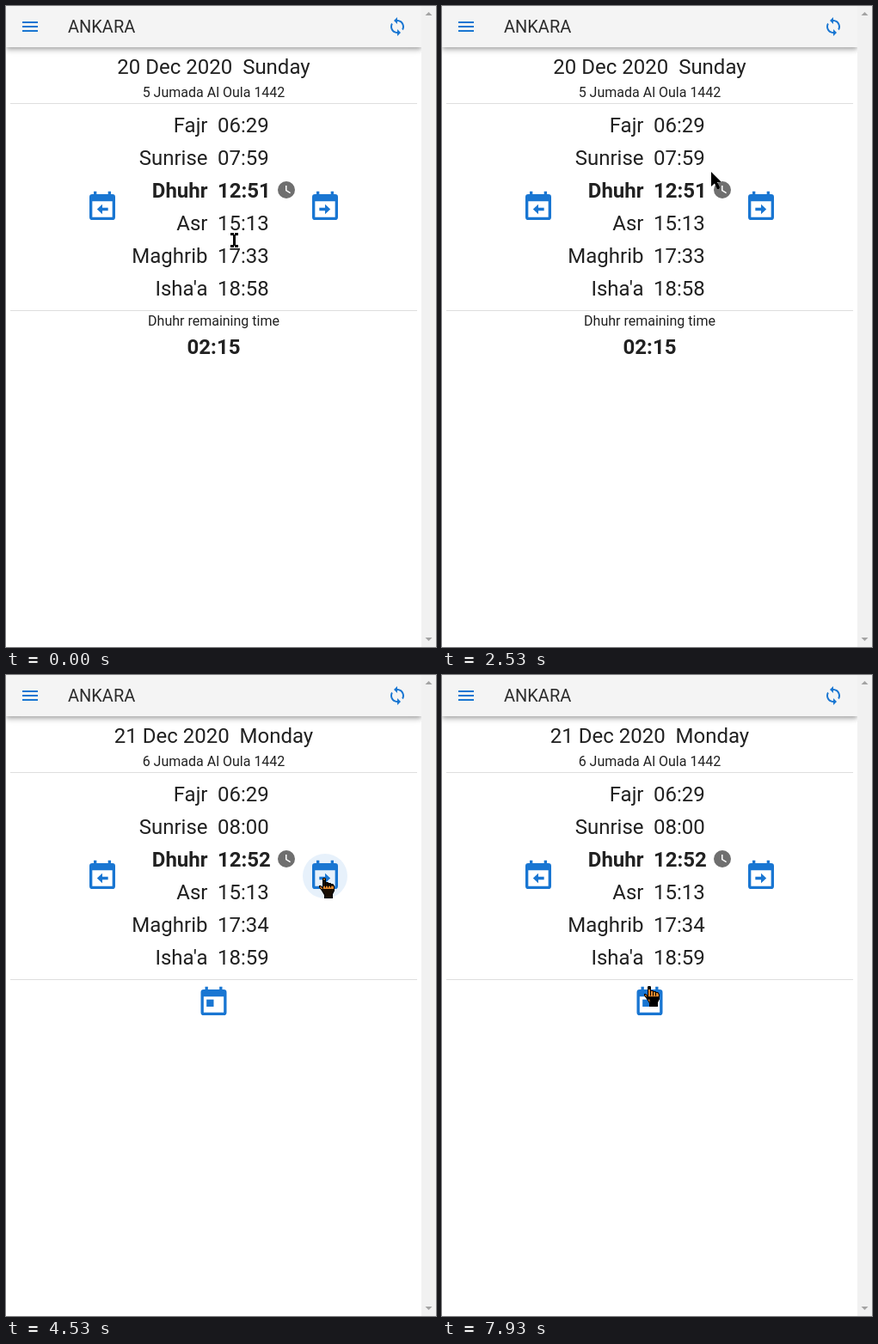
These frames come from a looping animation (500x746 px, 8000 ms). An HTML page with a canvas:

```html
<!DOCTYPE html>
<html lang="en">
<head>
<meta charset="utf-8">
<title>Prayer times</title>
<style>
html, body { margin: 0; width: 100%; height: 100%; overflow: hidden; background: #fff; }
canvas { display: block; width: 500px; height: 746px; }
</style>
</head>
<body>
<canvas id="stage"></canvas>
<script>
const W = 500, H = 746, PAGE = 483, LOOP = 8000, STEP = 200 / 3;
const BLUE = '#1976d2', INK = '#212121';
const canvas = document.getElementById('stage');
const ratio = window.devicePixelRatio || 1;
canvas.width = W * ratio;
canvas.height = H * ratio;
const ctx = canvas.getContext('2d');

const icons = {
  menu: 'M3 18h18v-2H3zM3 13h18v-2H3zM3 6v2h18V6z',
  sync: 'M12 4V1L8 5l4 4V6c3.31 0 6 2.69 6 6 0 1.01-.25 1.97-.7 2.8l1.46 1.46C19.54 15.03 20 13.57 20 12c0-4.42-3.58-8-8-8z' +
    'm0 14c-3.31 0-6-2.69-6-6 0-1.01.25-1.97.7-2.8L5.24 7.74C4.46 8.97 4 10.43 4 12c0 4.42 3.58 8 8 8v3l4-4-4-4z',
  clock: 'M12 2a10 10 0 1 0 0 20a10 10 0 1 0 0-20zm4.2 14.2L11 13V7h1.5v5.2l4.5 2.7z',
  calendar: 'M19 3h-1V1h-2v2H8V1H6v2H5a2 2 0 0 0-2 2v14a2 2 0 0 0 2 2h14a2 2 0 0 0 2-2V5a2 2 0 0 0-2-2zm0 16H5V8h14z',
  right: 'M8 12.5h4V10l3.7 3.5L12 17v-2.5H8z',
  left: 'M16 12.5h-4V10l-3.7 3.5L12 17v-2.5h4z',
  day: 'M7 10h5v5H7z'
};
for (const k in icons) icons[k] = new Path2D(icons[k]);

const names = ['Fajr', 'Sunrise', 'Dhuhr', 'Asr', 'Maghrib', "Isha'a"];
const days = [
  ['20 Dec 2020', 'Sunday', '5', '06:29 07:59 12:51 15:13 17:33 18:58'],
  ['21 Dec 2020', 'Monday', '6', '06:29 08:00 12:52 15:13 17:34 18:59'],
  ['22 Dec 2020', 'Tuesday', '7', '06:30 08:00 12:52 15:14 17:34 18:59']
];

// from = time the view becomes current, out = time it starts to slide away
const views = [
  { day: 0, from: 0, out: 3960, dir: -1 },
  { day: 1, from: 4520, out: 5158, dir: -1 },
  { day: 2, from: 5720, out: 6900, dir: 1 },
  { day: 1, from: 7460, out: 9999, dir: 1 }
];
const SLIDE = 530;
const LOAD = [1344, 2400];

const buttons = {
  sync: { x: 455, y: 24, r: 24, armed: 1330, taps: [1333] },
  prev: { x: 112, y: 234, r: 26, armed: 6650, taps: [6800] },
  next: { x: 371, y: 234, r: 26, armed: 3730, taps: [3733, 5000] },
  today: { x: 241.5, y: 381, r: 26, armed: 9999, taps: [] }
};

const track = [
  [0, 265, 272], [867, 453, 15], [1533, 453, 15], [1933, 347, 132],
  [2400, 318, 186], [3000, 309, 207], [3200, 346, 238], [3533, 369, 236],
  [6067, 369, 236], [6600, 112, 231], [7467, 112, 231],
  [7800, 223, 329], [7933, 240, 362], [8000, 240, 362]
];

function bezier(x1, y1, x2, y2) {
  const at = (a, b, s) => 3 * a * s * (1 - s) ** 2 + 3 * b * s * s * (1 - s) + s ** 3;
  return x => {
    if (x <= 0) return 0;
    if (x >= 1) return 1;
    let lo = 0, hi = 1;
    for (let i = 0; i < 24; i++) {
      const mid = (lo + hi) / 2;
      if (at(x1, x2, mid) < x) lo = mid; else hi = mid;
    }
    return at(y1, y2, lo);
  };
}
const ease = bezier(.25, .1, .25, 1);
const easeInOut = bezier(.42, 0, .58, 1);

// Hermite path with zero speed at both sides of a rest
function pointer(t) {
  let i = 0;
  while (i < track.length - 2 && t >= track[i + 1][0]) i++;
  const a = track[i], b = track[i + 1], span = b[0] - a[0];
  const u = Math.min(1, (t - a[0]) / span);
  const same = (p, q) => p[1] === q[1] && p[2] === q[2];
  const slope = (n, c) => {
    const p = track[n - 1], k = track[n], q = track[n + 1];
    if (!p || !q || same(p, k) || same(k, q)) return 0;
    return (q[c] - p[c]) / (q[0] - p[0]) * span;
  };
  const mix = c => a[c] * (2 * u ** 3 - 3 * u * u + 1) + b[c] * (3 * u * u - 2 * u ** 3) +
    slope(i, c) * (u ** 3 - 2 * u * u + u) + slope(i + 1, c) * (u ** 3 - u * u);
  return { x: Math.round(mix(1)), y: Math.round(mix(2)) };
}

function text(s, x, y, size, align = 'center', weight = 400, color = INK) {
  ctx.font = `${weight} ${size}px Roboto, sans-serif`;
  ctx.textAlign = align;
  ctx.fillStyle = color;
  ctx.fillText(s, x, y);
}

function icon(name, x, y, scale = 1, color = BLUE) {
  ctx.save();
  ctx.translate(x, y);
  ctx.scale(scale, scale);
  ctx.fillStyle = color;
  ctx.fill(icons[name], 'evenodd');
  ctx.restore();
}

function disc(x, y, r, alpha) {
  ctx.globalAlpha = alpha;
  ctx.fillStyle = BLUE;
  ctx.beginPath();
  ctx.arc(x, y, r, 0, 7);
  ctx.fill();
  ctx.globalAlpha = 1;
}

function feedback(b, t, hot) {
  if (hot === b && t >= b.armed) disc(b.x, b.y, b.r, .1);
  for (const tap of b.taps) {
    const u = (t - tap) / 350;
    if (u >= 0 && u < 1) disc(b.x, b.y, b.r * Math.min(1, .3 + u * 1.2), .2 * (1 - u));
  }
}

function calendar(b, glyph) {
  const x = b.x - 20, y = b.y - 20;
  icon('calendar', x, y, 5 / 3);
  icon(glyph, x, y, 5 / 3);
}

function content(view, shift, t, hot) {
  const [date, weekday, hijri, times] = days[view.day];
  ctx.save();
  ctx.beginPath();
  ctx.rect(0, 0, PAGE, H);
  ctx.clip();
  ctx.translate(shift, 0);
  text(`${date}\u00a0 ${weekday}`, 241.5, 79, 24);
  text(`${hijri} Jumada Al Oula 1442`, 241.5, 106, 16);
  ctx.fillStyle = 'rgba(0,0,0,.13)';
  ctx.fillRect(5, 113, 473, 1);
  ctx.fillRect(5, 354, 473, 1);
  times.split(' ').forEach((time, i) => {
    const y = 147 + 38 * i, weight = i === 2 ? 700 : 400;
    text(names[i], 234.5, y, 24, 'right', weight);
    text(time, 246, y, 24, 'left', weight);
  });
  icon('clock', 314, 202, 1, '#6f6f6f');
  feedback(buttons.prev, t, hot);
  feedback(buttons.next, t, hot);
  calendar(buttons.prev, 'left');
  calendar(buttons.next, 'right');
  if (view.day) {
    calendar(buttons.today, 'day');
  } else {
    text('Dhuhr remaining time', 241.5, 372, 16);
    text('02:15', 241.5, 405, 24, 'center', 700);
  }
  ctx.restore();
}

function spinner(t) {
  const turn = 2 * Math.PI, around = 40 * Math.PI;
  const phase = ((t - LOAD[0]) % 1500) / 750;
  const grow = easeInOut(phase), move = easeInOut(phase - 1);
  const from = 35 * grow + 89 * move;
  const to = Math.min(around, from + 1 + 88 * grow);
  const spin = (68 + (t - 1933) * .18) / 360 * turn;
  ctx.strokeStyle = BLUE;
  ctx.lineWidth = 19;
  ctx.lineCap = 'round';
  ctx.beginPath();
  ctx.arc(242, 373, 150, spin + from / around * turn, spin + to / around * turn);
  ctx.stroke();
}

function header(t, hot) {
  ctx.save();
  ctx.beginPath();
  ctx.rect(0, 0, PAGE, 80);
  ctx.clip();
  ctx.fillStyle = '#f4f4f4';
  for (const [blur, dy, spread, alpha] of [[4, 2, -1, .2], [5, 4, 0, .14], [10, 1, 0, .12]]) {
    ctx.shadowColor = `rgba(0,0,0,${alpha})`;
    ctx.shadowBlur = blur * ratio;
    ctx.shadowOffsetY = dy * ratio;
    ctx.fillRect(-spread, -spread, PAGE + 2 * spread, 48 + 2 * spread);
  }
  ctx.shadowColor = 'transparent';
  ctx.fillRect(0, 0, PAGE, 48);
  icon('menu', 16, 12);
  text('ANKARA', 72, 31, 20, 'left', 400, '#2c2c2c');
  feedback(buttons.sync, t, hot);
  icon('sync', 443, 12);
  ctx.restore();
}

function poly(points) {
  ctx.beginPath();
  for (let i = 0; i < points.length; i += 2) ctx.lineTo(points[i], points[i + 1]);
  ctx.closePath();
}

function scrollbar() {
  ctx.fillStyle = '#f1f1f1';
  ctx.fillRect(PAGE, 0, W - PAGE, H);
  ctx.fillStyle = '#a3a3a3';
  poly([487.5, 11, 491.5, 7, 495.5, 11]);
  ctx.fill();
  poly([487.5, 735, 491.5, 739, 495.5, 735]);
  ctx.fill();
}

const HAND = [0, 0, 2, 0, 3, 1, 3, 5, 5, 5, 6, 6, 8, 6, 9, 7, 11, 7, 12, 8, 13, 10, 13, 15, 11, 19,
  11, 24, 1, 24, 1, 20, -2, 15, -5, 11, -5, 9, -3, 9, -1, 11, -1, 1];
const ARROW = [0, 0, 11, 11, 11, 12, 7, 12, 10, 18, 9, 20, 7, 20, 4, 13.5, 0, 17];

function cursor(kind, x, y) {
  ctx.save();
  ctx.translate(x, y);
  ctx.fillStyle = '#000';
  if (kind === 'beam') {
    ctx.fillRect(-4, -8, 4, 3);
    ctx.fillRect(1, -8, 4, 3);
    ctx.fillRect(-1, -6, 3, 13);
    ctx.fillRect(-4, 6, 4, 3);
    ctx.fillRect(1, 6, 4, 3);
  } else if (kind === 'arrow') {
    poly(ARROW);
    ctx.fill();
  } else {
    // the inside of the hand inverts what lies below
    poly(HAND);
    ctx.clip();
    ctx.globalCompositeOperation = 'difference';
    ctx.fillStyle = '#fff';
    ctx.fill();
    ctx.globalCompositeOperation = 'source-over';
    ctx.strokeStyle = '#000';
    ctx.lineWidth = 2;
    ctx.stroke();
    ctx.lineWidth = 1;
    ctx.beginPath();
    for (const fx of [2.5, 5.5, 8.5]) {
      ctx.moveTo(fx, 5);
      ctx.lineTo(fx, 11);
    }
    ctx.stroke();
  }
  ctx.restore();
}

function draw(t) {
  ctx.setTransform(ratio, 0, 0, ratio, 0, 0);
  ctx.fillStyle = '#fff';
  ctx.fillRect(0, 0, W, H);

  const loading = t >= LOAD[0] && t < LOAD[1];
  const view = views.filter(v => t >= v.from).pop();
  const slid = (t - view.out) / SLIDE;
  const shown = !loading && slid < 1;
  const shift = view.dir * PAGE * ease(slid);

  const p = pointer(t);
  const over = b => Math.hypot(p.x - b.x - (b === buttons.sync ? 0 : shift), p.y - b.y) <= b.r;
  const live = [buttons.sync];
  if (shown) live.push(buttons.prev, buttons.next);
  if (shown && view.day) live.push(buttons.today);
  const hot = live.find(over);
  const px = p.x - shift;
  const onText = shown && ((px > 146 && px < 308 && p.y > 120 && p.y < 348) ||
    (px > 126 && px < 357 && p.y > 56 && p.y < 110));

  if (shown) content(view, shift, t, hot);
  if (loading) spinner(t);
  header(t, hot);
  scrollbar();
  cursor(hot ? 'hand' : onText ? 'beam' : 'arrow', p.x, p.y);
}

function tick() {
  const t = performance.now() % LOOP;
  draw(Math.floor((t + 4) / STEP) * STEP % LOOP);
  requestAnimationFrame(tick);
}
tick();
</script>
</body>
</html>
```
